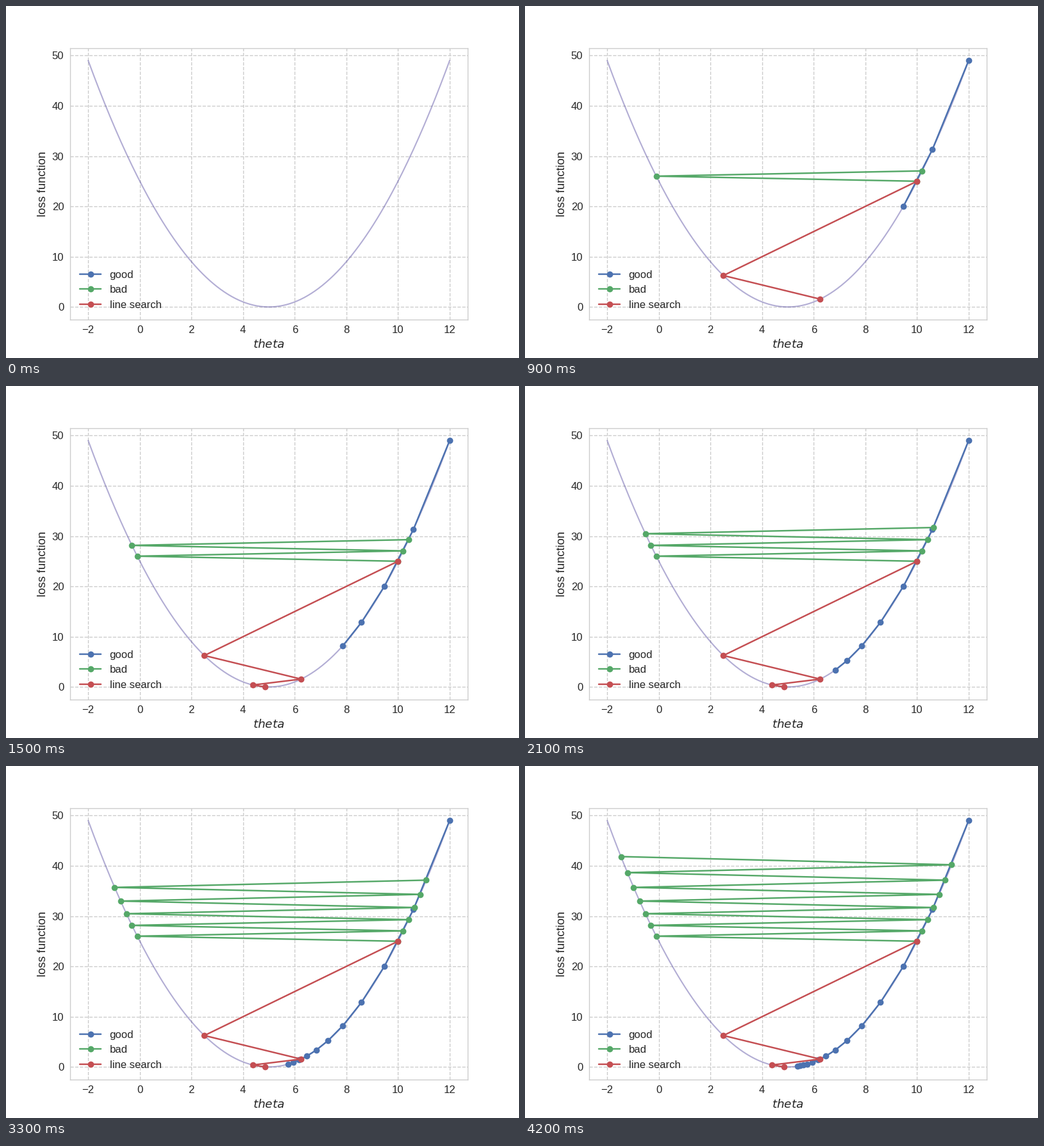
Animation, 800 px wide and 550 px high, one loop 4.5 s. Source, as a matplotlib script:

```python
import numpy as np
import matplotlib.pyplot as plt
from matplotlib.animation import FuncAnimation

FRAMES = 15
INTERVAL = 300
MINIMUM = 5

plt.rcParams.update({
    "font.family": "Liberation Sans",
    "mathtext.fontset": "dejavusans",
    "text.color": "0.15",
    "axes.labelcolor": "0.15",
    "axes.labelsize": 13.2,
    "axes.edgecolor": "0.8",
    "axes.linewidth": 1,
    "axes.axisbelow": True,
    "axes.grid": True,
    "grid.color": "0.8",
    "grid.linestyle": "--",
    "grid.linewidth": 1,
    "xtick.labelsize": 12,
    "ytick.labelsize": 12,
    "xtick.color": "0.15",
    "ytick.color": "0.15",
    "xtick.major.size": 0,
    "ytick.major.size": 0,
    "xtick.major.pad": 7,
    "ytick.major.pad": 7,
    "lines.linewidth": 1.75,
    "lines.markersize": 7,
    "lines.markeredgewidth": 0,
    "lines.solid_capstyle": "round",
    "legend.fontsize": 12,
    "legend.frameon": False,
})


def loss(theta):
    return (theta - MINIMUM) ** 2


steps = np.arange(FRAMES - 1)
# Each descent multiplies its distance from the minimum by a fixed ratio;
# the line search shortens its final step and then stops.
paths = [
    ("good", "#4C72B0", MINIMUM + 7 * 0.8 ** steps),
    ("bad", "#55A868", MINIMUM + 5 * (-1.02) ** steps),
    ("line search", "#C44E52",
     MINIMUM + 5 * np.array([1, -1 / 2, 1 / 4, -1 / 8, -1 / 32])),
]

fig, ax = plt.subplots(figsize=(8, 5.5), dpi=100)
fig.subplots_adjust(left=0.125, right=0.9, bottom=0.11, top=0.88)

theta = np.linspace(-2, 12, 200)
ax.plot(theta, loss(theta), color=(0.25, 0.2, 0.58), alpha=0.4, lw=1.5)
lines = [ax.plot([], [], "o-", color=color, label=label)[0]
         for label, color, _ in paths]

ax.set_xlim(-2.7, 12.7)
ax.set_ylim(-2.45, 51.45)
ax.set_xticks(range(-2, 13, 2))
ax.set_yticks(range(0, 51, 10))
ax.set_xlabel("$theta$")
ax.set_ylabel("loss function")
ax.legend(loc="lower left", numpoints=1)


def update(frame):
    for line, (_, _, points) in zip(lines, paths):
        shown = points[:frame]
        line.set_data(shown, loss(shown))
    return lines


anim = FuncAnimation(fig, update, frames=FRAMES, interval=INTERVAL,
                     repeat=True, repeat_delay=0)
plt.show()
```
